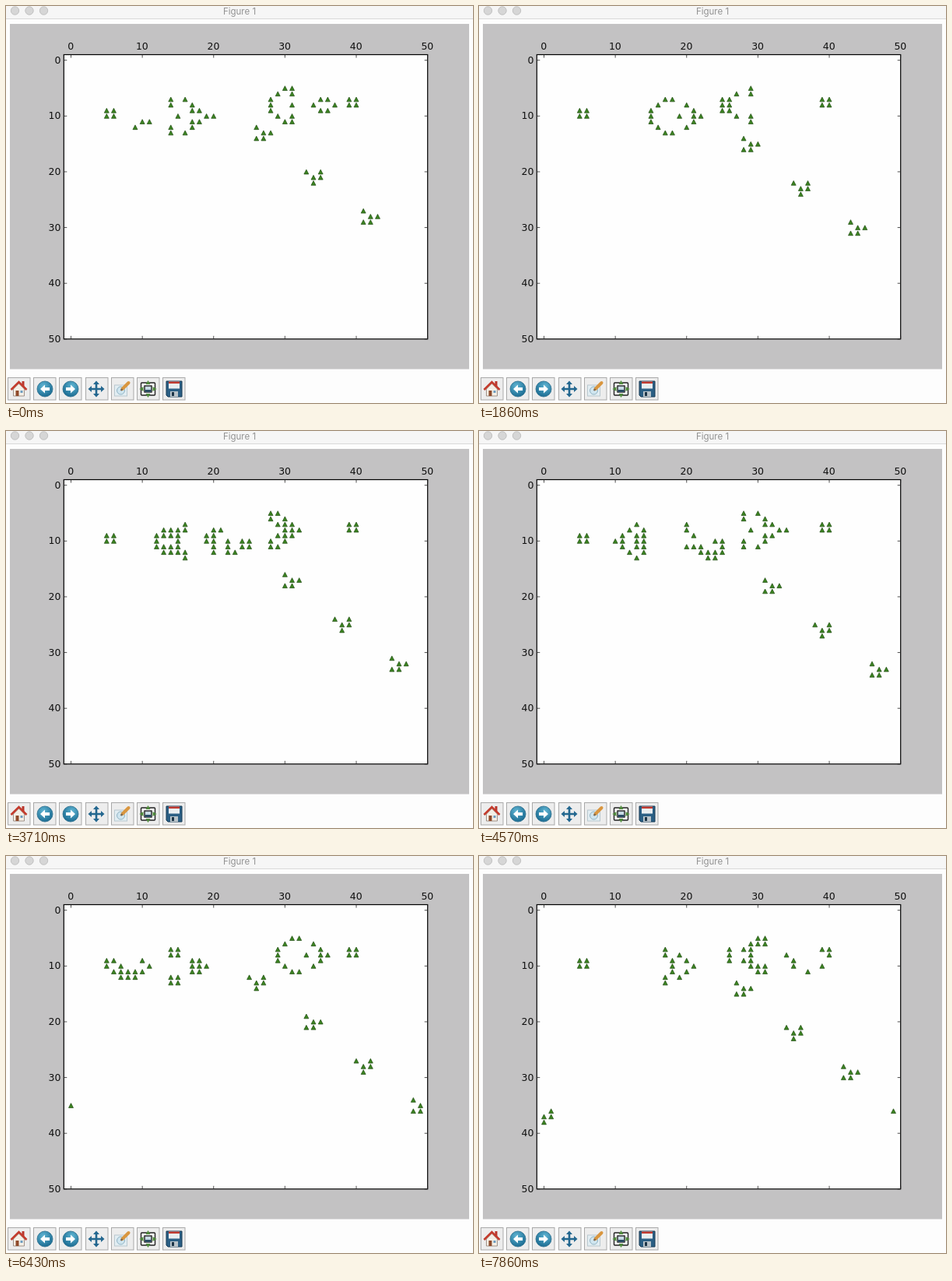
These frames come from a looping animation (600x510 px, 8000 ms). An HTML page:

```html
<!DOCTYPE html>
<html lang="en">
<head>
<meta charset="utf-8">
<title>Figure 1</title>
<style>
  html, body { margin: 0; width: 100%; height: 100%; overflow: hidden; background: #fdfdfd; }
  svg { display: block; width: 600px; height: 510px; }
  .title { font: 11.5px Inter, sans-serif; fill: #929292; text-anchor: middle; }
  .labels { font: 12.5px "DejaVu Sans", sans-serif; fill: #111; }
  .lights circle { fill: #d6d6d6; stroke: #c2c2c2; }
  #cells { fill: #3b8420; stroke: #1f4a12; stroke-width: .7; }
  .button { fill: #ededed; stroke: #a9a9a9; }
</style>
</head>
<body>
<svg viewBox="0 0 600 510">
  <defs>
    <radialGradient id="ball" cx=".4" cy=".3" r=".75">
      <stop offset="0" stop-color="#5fb4d2"/>
      <stop offset="1" stop-color="#17688f"/>
    </radialGradient>
    <g id="arrow">
      <circle r="10" fill="url(#ball)" stroke="#2a6d8c" stroke-width=".8"/>
      <path d="M-6 0 0-5.5V-2H6V2H0V5.5Z" fill="#fff"/>
    </g>
    <path id="spoke" d="M-1.3 0V-6H-4L0-10.5 4-6H1.3V0Z"/>
  </defs>

  <rect width="600" height="16" fill="#f6f6f6"/>
  <path d="M0 16.5H600" stroke="#d9d9d9"/>
  <g class="lights">
    <circle cx="11.5" cy="6" r="5.2"/>
    <circle cx="30" cy="6" r="5.2"/>
    <circle cx="48.5" cy="6" r="5.2"/>
  </g>
  <text class="title" x="300" y="11">Figure 1</text>

  <rect x="5" y="23" width="590" height="443.5" fill="#c3c2c3"/>
  <rect x="74.3" y="62.5" width="467.4" height="365.3" fill="#fefefe" stroke="#000" stroke-width="1.2"/>
  <path id="ticks" stroke="#222" stroke-width=".8"/>
  <g id="labels" class="labels"></g>
  <path id="cells"/>

  <g id="buttons"></g>
  <g transform="translate(16.5 492)">
    <path d="M-7 0V9H7V0L0-7Z" fill="#f4efe6" stroke="#8b7a70" stroke-width=".8"/>
    <path d="M4-10H7V-3H4Z" fill="#b9362c"/>
    <path d="M-10 1 0-9 10 1" fill="none" stroke="#c33a2c" stroke-width="2.6"/>
    <path d="M-4 2H0V9H-4Z" fill="#8f4a2b"/>
    <path d="M2 2H5V5H2Z" fill="#6d9cc0"/>
  </g>
  <use href="#arrow" transform="translate(50 492)"/>
  <use href="#arrow" transform="translate(83 492) scale(-1 1)"/>
  <g transform="translate(116 492)" fill="#23678f">
    <use href="#spoke"/>
    <use href="#spoke" transform="rotate(90)"/>
    <use href="#spoke" transform="rotate(180)"/>
    <use href="#spoke" transform="rotate(270)"/>
  </g>
  <g transform="translate(149.5 492)">
    <rect x="-10" y="-5" width="16" height="14" fill="#e3eef3" stroke="#b9c8cf"/>
    <circle cx="-2" cy="2" r="5" fill="#cfe5ef" stroke="#8fb3c4"/>
    <path d="M0 0 8-8" stroke="#d9963f" stroke-width="4" stroke-linecap="round"/>
    <path d="M-2 2 0 0" stroke="#765" stroke-width="2"/>
  </g>
  <g transform="translate(182.5 492)">
    <rect x="-9" y="-8" width="18" height="16" rx="1" fill="#f8f8f8" stroke="#222" stroke-width="1.4"/>
    <rect x="-4.5" y="-4" width="9" height="8" fill="#c9dbe6" stroke="#222" stroke-width="1.4"/>
    <path d="M0-11 3-6H-3ZM0 11 3 6H-3ZM-11 0-6-3V3ZM11 0 6-3V3Z" fill="#4f8a3c"/>
    <path d="M-4 1H4V4H-4Z" fill="#2c4d66"/>
  </g>
  <g transform="translate(216 492)">
    <path d="M-10-10H10V10H-8L-10 8Z" fill="#2b5f84" stroke="#173a55"/>
    <rect x="-7" y="-9.5" width="14" height="9" fill="#e9eef1"/>
    <path d="M-7-9.5H7V-7H-7Z" fill="#c0392f"/>
    <rect x="-5" y="3" width="10" height="7" fill="#b9c3c9"/>
    <rect x="-3" y="4" width="3" height="5" fill="#1d3648"/>
  </g>
</svg>
<script>
const SIZE = 50, LOOP = 8000, FRAMES = 56;
const FIRST_GENERATION = 82, GENERATIONS = 35;
const byId = id => document.getElementById(id);
const plotX = col => 83.5 + col * 9.163;
const plotY = row => 69.7 + row * 7.163;

// Gosper glider gun
const GUN = `
........................O
......................O.O
............OO......OO............OO
...........O...O....OO............OO
OO........O.....O...OO
OO........O...O.OO....O.O
..........O.....O.......O
...........O...O
............OO`.trim().split('\n');

function startBoard() {
  const board = new Uint8Array(SIZE * SIZE);
  GUN.forEach((line, y) => [...line].forEach((mark, x) => {
    if (mark === 'O') board[(y + 5) * SIZE + x + 5] = 1;
  }));
  return board;
}

const wrap = n => (n + SIZE) % SIZE;

function step(board) {
  return board.map((alive, i) => {
    const x = i % SIZE, y = Math.floor(i / SIZE);
    let sum = -alive;
    for (let dy = -1; dy <= 1; dy++)
      for (let dx = -1; dx <= 1; dx++)
        sum += board[wrap(y + dy) * SIZE + wrap(x + dx)];
    return sum === 3 || (alive && sum === 2) ? 1 : 0;
  });
}

function trianglePath(board) {
  let d = '';
  board.forEach((alive, i) => {
    if (!alive) return;
    const x = plotX(i % SIZE), y = plotY(Math.floor(i / SIZE));
    d += `M${x.toFixed(2)} ${(y - 2.8).toFixed(2)}l3 5.8h-6z`;
  });
  return d;
}

function drawAxes() {
  let ticks = '', labels = '';
  for (let n = 0; n <= SIZE; n += 10) {
    const x = plotX(n), y = plotY(n);
    ticks += `M${x} 62.5v4M${x} 427.8v-4M74.3 ${y}h4M541.7 ${y}h-4`;
    labels += `<text x="${x - .3}" y="56" text-anchor="middle">${n}</text>` +
      `<text x="70.5" y="${y + 4}" text-anchor="end">${n}</text>`;
  }
  byId('ticks').setAttribute('d', ticks);
  byId('labels').innerHTML = labels;
}

function drawButtons() {
  let html = '';
  for (let i = 0; i < 7; i++)
    html += `<rect class="button" x="${2.5 + Math.round(i * 33.2)}" y="477.5" width="28.5" height="28.5"/>`;
  byId('buttons').innerHTML = html;
}

let board = startBoard();
for (let i = 0; i < FIRST_GENERATION; i++) board = step(board);
const paths = [];
for (let i = 0; i < GENERATIONS; i++) {
  paths.push(trianglePath(board));
  board = step(board);
}

drawAxes();
drawButtons();

// The board advances a little slower than the seven frames a second.
const origin = performance.now();
let shown = -1;
function render(now) {
  const time = Math.max(0, now - origin) % LOOP;
  const frame = Math.min(FRAMES - 1, Math.floor((time + 5) * 7 / 1000));
  const generation = Math.floor(frame * .62 + .47);
  if (generation !== shown) byId('cells').setAttribute('d', paths[shown = generation]);
  requestAnimationFrame(render);
}
render(origin);
</script>
</body>
</html>
```
